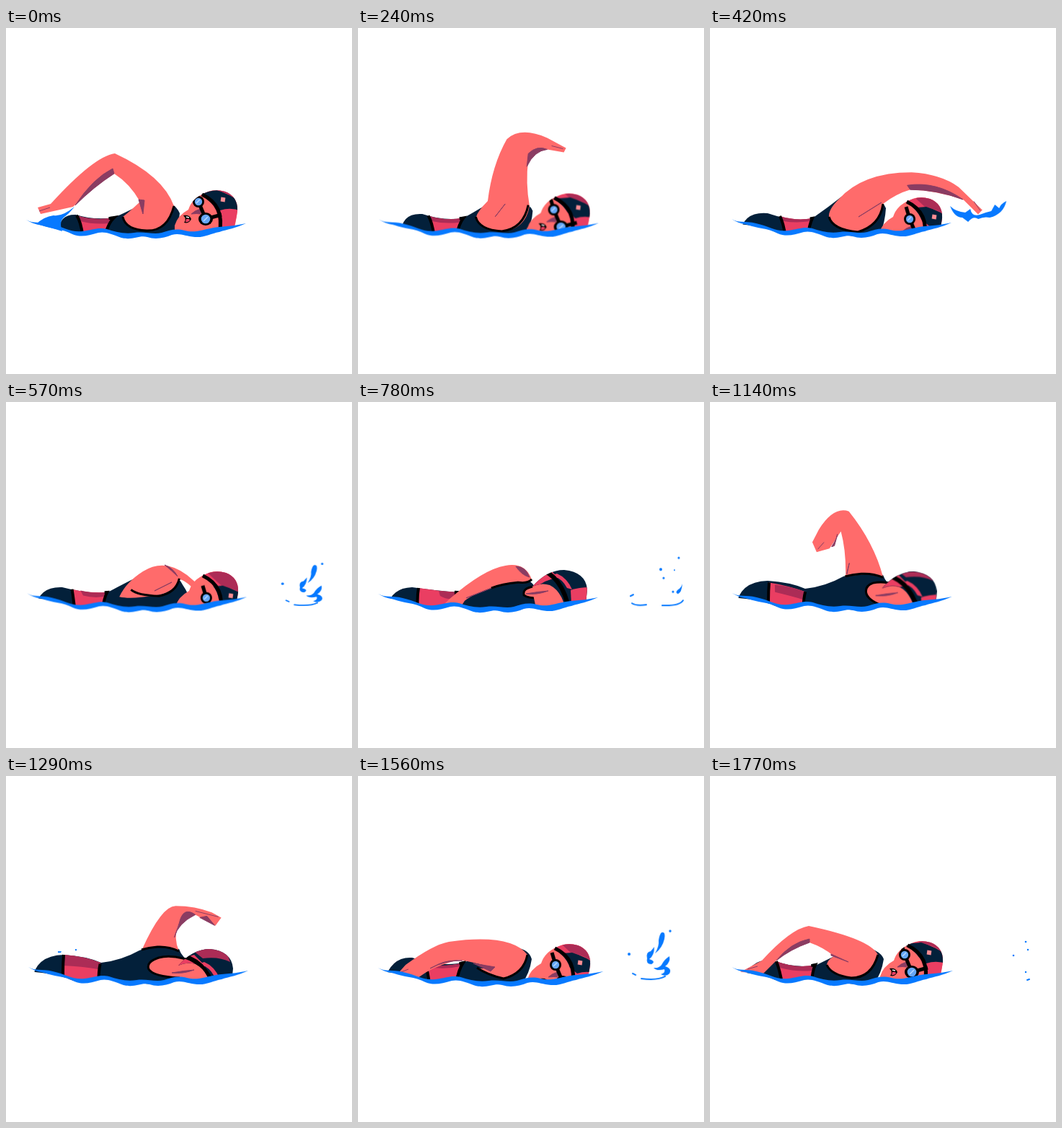
Recreate the animation shown at these times as an HTML page without scripts. Size 480 by 480 pixels, loop 1.8 s.

```html
<!DOCTYPE html>
<html lang="en">
<head>
<meta charset="utf-8">
<title>Swimmer</title>
<style>
html, body { margin: 0; width: 100%; height: 100%; overflow: hidden; background: #fff; }
svg { display: block; width: 100vw; height: 100vh; }
svg * { animation-duration: 1.8s; animation-iteration-count: infinite; animation-timing-function: linear; }

.skin { fill: #ff6b6b; }
.navy { fill: #03203a; }
.red { fill: #ea3e62; }
.wine { fill: #ac2c56; }
.blue { fill: #0779ff; }
.ink { fill: none; stroke: #000; }
.shade { fill: #8a3c62; stroke: #8a3c62; stroke-width: 1; }
.ripple { fill: none; stroke: #0779ff; stroke-width: 2; stroke-linecap: round; }

/* The two halves of the stroke */
.front { animation-name: front; animation-timing-function: step-end; }
.back { animation-name: back; animation-timing-function: step-end; }
@keyframes front { 0% { visibility: visible } 33.33% { visibility: hidden } 81.67%, 100% { visibility: visible } }
@keyframes back { 0% { visibility: hidden } 33.33% { visibility: visible } 81.67%, 100% { visibility: hidden } }

.wave { animation-name: wave; }
@keyframes wave {
  0%, 5%, 43.33% { transform: none }
  23.33%, 51.67% { transform: translate(2px, -1px) }
  71.67% { transform: translate(3px, -1px) }
  86.67% { transform: translate(-1px, 0) scaleX(1.025) }
  98.33%, 100% { transform: translate(2px, -1px) scaleX(1.006) }
}

.body { animation-name: body; }
@keyframes body {
  0%, 5% { d: path("M74 290Q70 258 97 259Q122 267 150 263Q175 252 205 235Q234 240 241 257Q240 275 226 300L226 305L74 305Z") }
  23.33% { d: path("M42 285Q46 254 80 257Q118 270 142 264Q165 248 185 232Q238 232 244 250Q243 270 232 300L232 305L42 305Z") }
  43.33% { d: path("M40 285Q46 258 75 257Q110 262 140 264Q180 248 215 240Q240 244 246 258Q270 262 300 275L300 305L40 305Z") }
  51.67% { d: path("M36 285Q48 252 80 254Q112 262 138 270Q165 270 176 260Q225 250 242 249Q246 268 242 285L242 305L36 305Z") }
  71.67% { d: path("M36 285Q40 249 80 248Q112 250 132 259Q160 256 185 242Q212 231 240 240Q244 252 260 262Q262 275 275 285L275 305L36 305Z") }
  86.67% { d: path("M36 285Q46 250 75 252Q118 266 148 258Q175 250 205 238Q236 236 241 254Q238 275 226 290L226 305L36 305Z") }
  98.33%, 100% { d: path("M46 285Q56 253 85 255Q120 268 148 262Q175 248 205 235Q236 240 241 254Q238 275 226 290L226 305L46 305Z") }
}

.band { animation-name: band; }
@keyframes band {
  0%, 5% { d: path("M98 260Q122 268 150 263Q140 272 134 300L108 300Q105 270 98 260Z") }
  23.33% { d: path("M97 261Q120 268 142 264Q137 274 134 300L106 300Q103 272 97 261Z") }
  43.33% { d: path("M84 258Q110 262 138 264Q132 272 130 300L84 300Q81 275 84 258Z") }
  51.67% { d: path("M85 254Q112 262 134 269Q131 278 130 300L85 300Q83 275 85 254Z") }
  71.67% { d: path("M80 248Q108 250 131 259Q128 270 128 300L80 300Q78 270 80 248Z") }
  86.67% { d: path("M93 261Q120 266 146 259Q138 270 134 300L100 300Q98 272 93 261Z") }
  98.33%, 100% { d: path("M92 257Q120 268 146 262Q141 272 140 300L102 300Q98 272 92 257Z") }
}

.dark { animation-name: dark; }
@keyframes dark {
  0%, 5% { d: path("M98 260Q122 268 150 263L142 271Q122 273 103 268Z") }
  23.33% { d: path("M97 261Q120 268 142 264L139 268Q120 271 102 268Z") }
  43.33% { d: path("M112 262Q125 264 138 264L132 273Q122 274 114 269Z") }
  51.67% { d: path("M104 261Q120 264 134 269L131 283Q122 276 106 265Z") }
  71.67% { d: path("M80 248Q108 250 131 259L128 268Q105 264 79 263Z") }
  86.67% { d: path("M93 261Q120 266 146 259L142 264Q120 269 96 265Z") }
  98.33%, 100% { d: path("M92 257Q120 268 146 262L141 270Q120 272 97 266Z") }
}

.strap { animation-name: strap; }
@keyframes strap {
  0%, 5% { d: path("M233 247Q224 282 195 281Q166 280 162 262") }
  23.33% { d: path("M240 244Q236 274 205 283Q170 280 165 262") }
  43.33% { d: path("M241 246Q236 252 222 250Q200 252 185 258") }
  51.67% { d: path("M242 250Q240 270 205 269Q178 272 175 262") }
  63.9%, 71.67% { d: path("M240 243Q225 236 210 237Q198 238 188 241") }
  78.33% { d: path("M241 245Q230 240 212 240Q198 242 188 246") }
  86.67% { d: path("M235 248Q230 274 202 281Q180 276 165 266") }
  98.33%, 100% { d: path("M233 248Q224 280 196 280Q168 276 162 262") }
}

.near { animation-name: near; }
@keyframes near {
  0%, 5% { d: path("M44 249L62 244Q122 178 151 174Q218 205 233 247Q224 282 195 281Q166 280 162 262Q170 256 186 241Q172 216 150 202Q122 220 93 248L48 258Z") }
  8.33% { d: path("M118 196L128 180Q160 138 186 146Q225 196 236 247Q228 282 198 281Q167 280 163 262Q168 256 184 238Q182 205 174 176Q160 185 146 198L126 208Z") }
  13.33% { d: path("M285 172L262 168Q246 170 236 182Q232 215 238 247Q232 280 200 282Q168 280 164 262Q166 254 180 240Q186 190 206 154Q225 136 262 152L288 166Z") }
  18.33% { d: path("M333 222L310 206Q280 198 260 206Q246 220 239 245Q234 277 203 283Q169 280 165 262Q165 253 179 240Q196 192 244 176Q280 172 308 189L340 216Z") }
  23.33% { d: path("M372 258L352 238Q315 225 278 224Q258 230 240 244Q236 274 205 283Q170 280 165 262Q164 252 178 238Q212 200 280 200Q320 202 345 220L378 252Z") }
  30% { d: path("M360 310L330 300Q290 275 270 262Q250 245 241 246Q236 268 210 275Q175 278 165 266Q168 250 190 236Q225 212 265 240Q300 265 340 300L360 315Z") }
  33.33% { d: path("M300 310L290 300Q270 280 262 268Q250 250 241 246Q230 262 205 262Q170 270 150 274Q165 250 190 234Q215 220 238 240Q270 270 290 300L300 310Z") }
  81.67% { d: path("M70 300L100 284Q150 245 180 236Q225 225 236 248Q232 268 205 274Q185 274 175 268Q180 268 180 266Q160 266 145 272Q125 285 110 295L90 302Z") }
  86.67% { d: path("M50 280L66 262Q104 234 126 230Q212 218 235 248Q230 274 202 281Q180 276 165 266Q175 268 188 266Q160 258 140 255Q115 261 95 272L80 282Z") }
  98.33%, 100% { d: path("M42 272L72 256Q112 212 137 208Q222 226 233 248Q224 280 196 280Q168 276 162 262Q163 255 172 250Q158 238 138 231Q112 240 92 256L74 274Z") }
}

.nearShade { animation-name: nearShade; }
@keyframes nearShade {
  0%, 5% { d: path("M150 202Q122 220 96 246Q120 209 148 195ZM184 238L192 239L190 258ZM46 254L61 249") }
  8.33% { d: path("M174 176Q160 185 146 198Q158 180 172 170ZM184 236L192 238L190 258ZM122 202L132 196") }
  13.33% { d: path("M234 192Q244 170 262 168Q248 162 236 174ZM190 262L204 244L190 262ZM268 163L284 167") }
  23.33% { d: path("M278 224Q315 224 352 238Q315 212 274 218ZM206 262L238 242L206 262ZM366 240L375 253") }
  30%, 33.33% { d: path("M238 242Q232 230 220 226Q230 234 238 242ZM206 262L230 250L206 262ZM366 290L375 300") }
  81.67% { d: path("M110 284Q125 274 150 266Q130 274 112 284ZM165 266L190 267L186 272ZM60 290L70 288") }
  86.67% { d: path("M100 267Q120 256 145 256Q125 255 112 261ZM160 260L190 265L184 271ZM60 272L70 268") }
  98.33%, 100% { d: path("M138 231Q112 240 92 256Q112 231 138 226ZM168 247L192 258L168 249ZM52 268L66 264") }
}

.far { animation-name: far; }
@keyframes far {
  0%, 33.33% { d: path("M100 305L140 278Q175 242 205 230Q232 222 241 246Q234 256 218 254Q196 256 185 260Q175 264 165 268Q155 274 150 280Q140 290 130 300L110 305Z") }
  43.33% { d: path("M100 300L128 273Q175 232 205 227Q232 222 241 246Q236 252 222 250Q200 252 185 258Q175 261 165 266Q155 270 148 276Q140 290 130 300L110 305Z") }
  51.67% { d: path("M42 268L58 238Q70 226 140 223Q235 208 242 250Q240 270 205 269Q178 272 175 262Q178 258 186 254Q170 244 150 242Q110 238 74 241L60 261Z") }
  58.33% { d: path("M62 240L80 228Q130 165 160 170Q225 200 242 246Q238 260 210 261Q184 264 180 256Q184 250 190 242Q176 212 158 194Q130 210 104 236L68 250Z") }
  63.9% { d: path("M150 190L158 172Q176 142 196 150Q228 195 240 243Q225 236 210 237Q198 238 188 241Q188 241 188 240Q190 205 184 178Q178 190 172 200L156 204Z") }
  67.2% { d: path("M250 178L238 172Q232 176 228 184Q232 215 240 243Q225 236 210 237Q198 238 188 241Q188 241 188 240Q188 190 205 152Q224 144 244 162L254 172Z") }
  71.67% { d: path("M290 207L262 192Q248 196 238 208Q232 225 240 243Q225 236 210 237Q198 238 188 241Q188 241 189 240Q216 180 235 180Q262 180 285 189L298 196Z") }
  78.33% { d: path("M372 258L352 240Q315 228 285 228Q258 232 241 245Q230 240 212 240Q198 242 188 246Q186 244 186 242Q215 206 282 206Q325 206 348 224L378 252Z") }
  81.67%, 100% { d: path("M350 300L330 290Q300 270 280 260Q258 248 241 246Q230 248 212 250Q198 254 186 256Q184 250 188 244Q215 220 262 244Q310 260 340 290L355 300Z") }
}

.farShade { animation-name: farShade; }
@keyframes farShade {
  0%, 43.33% { d: path("M220 228Q234 228 239 243Q228 240 220 228ZM150 272L185 258L150 272ZM140 300L141 300") }
  51.67% { d: path("M73 241Q74 250 70 256Q62 252 64 244ZM160 244L208 260L186 253ZM43 266L53 249") }
  58.33% { d: path("M158 194Q130 210 104 236Q128 205 156 189ZM190 240L206 258L190 246ZM66 246L80 240") }
  63.9% { d: path("M174 200Q180 188 184 178Q182 186 170 202ZM190 236L192 220L190 238ZM158 200L166 190") }
  71.67% { d: path("M233 224Q238 204 262 192Q245 180 240 204ZM268 196L289 207L278 194ZM262 187L294 195") }
  78.33% { d: path("M285 228Q315 226 350 240Q318 218 278 222ZM366 240L372 252L368 242ZM360 240L374 254") }
  81.67%, 100% { d: path("M285 270Q315 280 350 300Q318 290 278 270ZM366 290L372 295L368 292ZM360 290L374 294") }
}

.shoulder { animation-name: shoulder; }
@keyframes shoulder {
  0%, 43.33% { d: path("M300 272Q262 254 244 256Q228 258 230 268Q236 273 258 272L302 270") }
  51.67% { d: path("M300 262Q262 246 246 250Q242 252 244 264Q246 276 250 290L300 300") }
  71.67%, 100% { d: path("M270 262Q235 246 212 252Q194 258 198 268Q204 278 240 280L280 290") }
}

.face { animation-name: face; }
@keyframes face {
  0%, 5% { transform: none }
  23.33%, 33.33% { transform: translate(1px, 10px) }
  81.67%, 86.67% { transform: translate(1px, 8px) }
  98.33%, 100% { transform: translate(2px, 4px) }
}
.turn { animation-name: turn; }
@keyframes turn {
  0%, 5% { transform: none }
  23.33% { transform: translate(9px, 14px) }
  33.33%, 81.67% { transform: translate(10px, 22px) }
  86.67% { transform: translate(6px, 13px) }
  98.33%, 100% { transform: translate(1px, 3px) }
}
.nape { animation-name: nape; }
@keyframes nape {
  0%, 43.33% { transform: none }
  51.67% { transform: translate(-4px, -4px) }
  71.67%, 100% { transform: translate(-3px, 7px) }
}
.roll { animation-name: roll; }
@keyframes roll {
  0%, 51.67% { transform: none }
  71.67%, 100% { transform: translate(2px, 13px) }
}

/* Water thrown up by the hands */
.kick { transform-origin: 75px 276px; animation-name: kick; }
@keyframes kick { 0%, 5% { transform: none } 11%, 100% { transform: scale(.7, 0) } }
.tail { animation-name: tail; }
@keyframes tail {
  0%, 64% { opacity: 0; transform: translateY(14px) }
  66% { opacity: 1 }
  71.67% { opacity: 1; transform: none }
  75% { opacity: 1; transform: translateY(8px) }
  75.1%, 100% { opacity: 0 }
}
.burst { transform-origin: 372px 266px; }
.b1 { animation-name: b1; }
.b2 { animation-name: b2; }
@keyframes b1 {
  0%, 21.6% { transform: scale(0) }
  23.33% { transform: none }
  27.5% { transform: translate(12px, 6px) scale(1.1, 1.3) }
  27.6%, 100% { transform: scale(0) }
}
@keyframes b2 {
  0%, 77% { transform: scale(0) }
  78.5% { transform: none }
  81.6% { transform: translate(12px, 6px) scale(1.1, 1.3) }
  81.7%, 100% { transform: scale(0) }
}
.plume { transform-origin: 410px 282px; }
.p1 { animation-name: p1; }
.p2 { animation-name: p2; }
@keyframes p1 {
  0%, 27.5% { opacity: 0; transform: scale(.9, .5) }
  27.6% { opacity: 1; transform: scale(.9, .6) }
  34% { opacity: 1; transform: translateX(10px) }
  40% { opacity: 1; transform: translateX(18px) scale(.9) }
  40.1%, 100% { opacity: 0 }
}
@keyframes p2 {
  0%, 81.6% { opacity: 0; transform: scale(.9, .6) }
  81.7% { opacity: 1; transform: scale(.9, .6) }
  86.67% { opacity: 1; transform: none }
  91.6% { opacity: 1; transform: translateX(5px) scale(.9, .85) }
  91.7%, 100% { opacity: 0 }
}
.d1 { animation-name: d1; }
.d2 { animation-name: d2; }
.d3 { animation-name: d3; }
@keyframes d1 {
  0%, 40% { opacity: 0; transform: translateY(-8px) }
  40.1% { opacity: 1; transform: translateY(-6px) }
  43.33% { opacity: 1; transform: none }
  48.3% { opacity: 1; transform: translateY(16px) }
  48.4%, 100% { opacity: 0 }
}
@keyframes d2 {
  0%, 48.3% { opacity: 0; transform: translateY(-14px) }
  48.4% { opacity: 1; transform: translateY(-12px) }
  51.67% { opacity: 1; transform: none }
  55% { opacity: 1; transform: translateY(8px) }
  55.1%, 100% { opacity: 0 }
}
@keyframes d3 {
  0%, 91.6% { opacity: 0; transform: translateY(-16px) }
  91.7% { opacity: 1; transform: translateY(-16px) }
  98.33%, 100% { opacity: 1; transform: none }
}
</style>
</head>
<body>
<svg viewBox="0 0 480 480">
  <defs>
    <clipPath id="above"><path d="M0 0H480V270L333 272Q300 279 286 281Q264 289 248 285Q236 280 222 286Q204 291 188 287Q168 290 152 284Q132 277 116 284Q98 288 84 280Q64 274 40 272L28 267H0Z"/></clipPath>
    <path id="cap" d="M270 232Q286 222 304 227Q322 234 321 254Q319 270 312 290H292Q303 250 270 232Z"/>
    <path id="skull" d="M276 229Q288 222 304 227Q322 234 321 254Q319 270 312 300H234V274Q238 260 253 252Q258 236 276 229Z"/>
    <path id="hood" d="M242 256Q262 233 286 233Q316 236 318 260L314 300H290Q286 264 266 254Q254 250 242 256Z"/>
    <clipPath id="inCap"><use href="#cap"/></clipPath>
    <clipPath id="inSkull"><use href="#skull"/></clipPath>
    <clipPath id="inHood"><use href="#hood"/></clipPath>
    <path id="burst" d="M333 247Q339 263 350 263L358 269Q365 260 372 265Q380 261 388 263Q407 258 411 240Q403 244 401 250L395 245L390 254Q381 256 374 259Q363 262 361 251L354 256Q341 255 333 247Z"/>
    <g id="plume">
      <path d="M421 217Q427 215 425 226Q422 239 412 246Q418 236 417 228Q418 220 421 217ZM411 237Q411 249 404 254Q414 257 407 261Q399 261 401 253Q399 244 406 243ZM432 250Q434 258 426 264Q436 267 432 274Q427 279 420 275Q427 273 425 268Q414 271 410 266Q417 267 421 262Q425 254 432 250Z"/>
      <circle cx="433" cy="215" r="1.7"/><circle cx="376" cy="247" r="2"/>
      <path class="ripple" d="M381 274L385 276M393 281Q415 284 426 278"/>
    </g>
  </defs>

  <g clip-path="url(#above)">
    <path class="navy body"/>
    <path class="red band"/>
    <path class="dark wine"/>
    <path class="ink band" pathLength="100" stroke-width="4" stroke-dasharray="0 28 23 26 23 0"/>

    <g class="back">
      <path class="skin shoulder" stroke="#000" stroke-width="3"/>
      <path class="skin far"/>
      <path class="shade farShade"/>
    </g>
    <g class="front">
      <path class="skin near"/>
      <path class="shade nearShade"/>
    </g>
    <path class="ink strap" stroke-width="3"/>

    <g class="front"><g class="face">
      <use class="skin" href="#skull"/>
      <use class="red" href="#cap"/>
      <g clip-path="url(#inCap)"><g class="turn">
        <path class="wine" d="M262 200H330V246Q312 228 288 224Z"/>
        <path class="navy" d="M264 226L290 224Q310 230 326 242V254Q312 248 297 253Z"/>
        <rect x="298" y="235" width="6" height="6" fill="#ff8e94" transform="rotate(8 301 238)"/>
      </g></g>
      <path class="ink" d="M272 231Q304 246 296 285" stroke-width="5"/>
      <g clip-path="url(#inSkull)"><g class="turn">
        <path class="shade" d="M270 251Q262 253 257 258Q265 257 270 258Z"/>
        <path class="ink" d="M262 224L267 241L277 265L299 259" stroke-width="5"/>
        <circle cx="267" cy="241" r="8"/>
        <ellipse cx="277" cy="265" rx="10" ry="9"/>
        <circle cx="267" cy="241" r="5.2" fill="#65a6f5"/>
        <circle cx="277" cy="265" r="6.3" fill="#65a6f5"/>
        <path d="M264 243L269 238M274 268L280 262" stroke="#b9d8ff" stroke-width="1.5"/>
        <path d="M246 260Q255 259 257 265Q254 272 247 270Q251 265 246 260Z"/>
        <path class="red" d="M250 265Q255 264 255 267Q252 270 249 269Z"/>
        <path d="M250 262L254 263" stroke="#fff" stroke-width="1.5"/>
      </g></g>
    </g></g>

    <g class="back"><g class="nape">
      <path class="skin" d="M242 256Q262 238 284 240L300 300H250L244 272Z"/>
      <path class="shade" d="M233 266Q250 263 264 262Q248 268 233 266Z"/>
      <use class="navy" href="#hood"/>
      <g clip-path="url(#inHood)"><g class="roll">
        <path class="red" d="M236 262V236L262 228L278 244Q258 246 244 260Z"/>
        <path class="wine" d="M250 214H304L312 238Q296 230 274 233Z"/>
        <path class="red" d="M270 240Q284 246 290 258L297 260Q290 244 276 238Z"/>
        <path class="red" d="M295 261Q306 257 322 257V300H297Z"/>
        <path class="ink" d="M248 230Q284 240 293 290" stroke-width="6"/>
      </g></g>
    </g></g>
  </g>

  <g class="blue">
    <path class="wave" d="M28 266C38 272 46 268 62 272C80 276 90 284 106 282C120 280 128 276 140 279C152 283 164 286 178 284C192 282 204 287 216 284C228 280 236 278 248 281C262 285 276 279 288 277C302 275 316 275 333 271C318 278 308 279 296 283C284 285 276 291 262 290C248 289 242 284 230 287C220 291 208 294 196 290C184 287 176 295 160 291C146 286 138 282 128 284C114 288 104 291 92 286C78 278 62 279 50 274C42 272 38 272 28 266Z"/>
    <path class="kick" d="M42 272Q52 262 66 260Q78 262 95 248Q87 258 81 262Q73 268 78 282Q60 276 42 272Z"/>
    <path class="tail" d="M72 243L77 243L76 245L72 245ZM96 240L98 240L98 242L96 242Z"/>
    <use class="burst b1" href="#burst"/>
    <use class="burst b2" href="#burst"/>
    <use class="plume p1" href="#plume"/>
    <use class="plume p2" href="#plume"/>
    <g class="d1">
      <circle cx="445" cy="216" r="1.6"/><circle cx="420" cy="232" r="2"/>
      <circle cx="439" cy="233" r="1"/><circle cx="424" cy="244" r="1.6"/>
      <path d="M450 252Q449 264 444 266Q439 264 444 260Q448 258 450 252Z"/>
      <circle cx="437" cy="263" r="1.6"/>
      <path class="ripple" d="M378 269L382 267M380 279Q386 283 400 281M422 282Q446 283 451 275"/>
    </g>
    <g class="d2">
      <circle cx="370" cy="280" r="1.3"/><circle cx="446" cy="272" r="1.5"/>
      <path class="ripple" d="M449 285L451 284"/>
    </g>
    <g class="d3">
      <circle cx="438" cy="230" r="1.3"/><circle cx="441" cy="241" r="1.2"/>
      <circle cx="421" cy="249" r="1.3"/><circle cx="438" cy="272" r="1.2"/>
      <path class="ripple" d="M440 283L443 282"/>
    </g>
  </g>
</svg>
</body>
</html>
```
